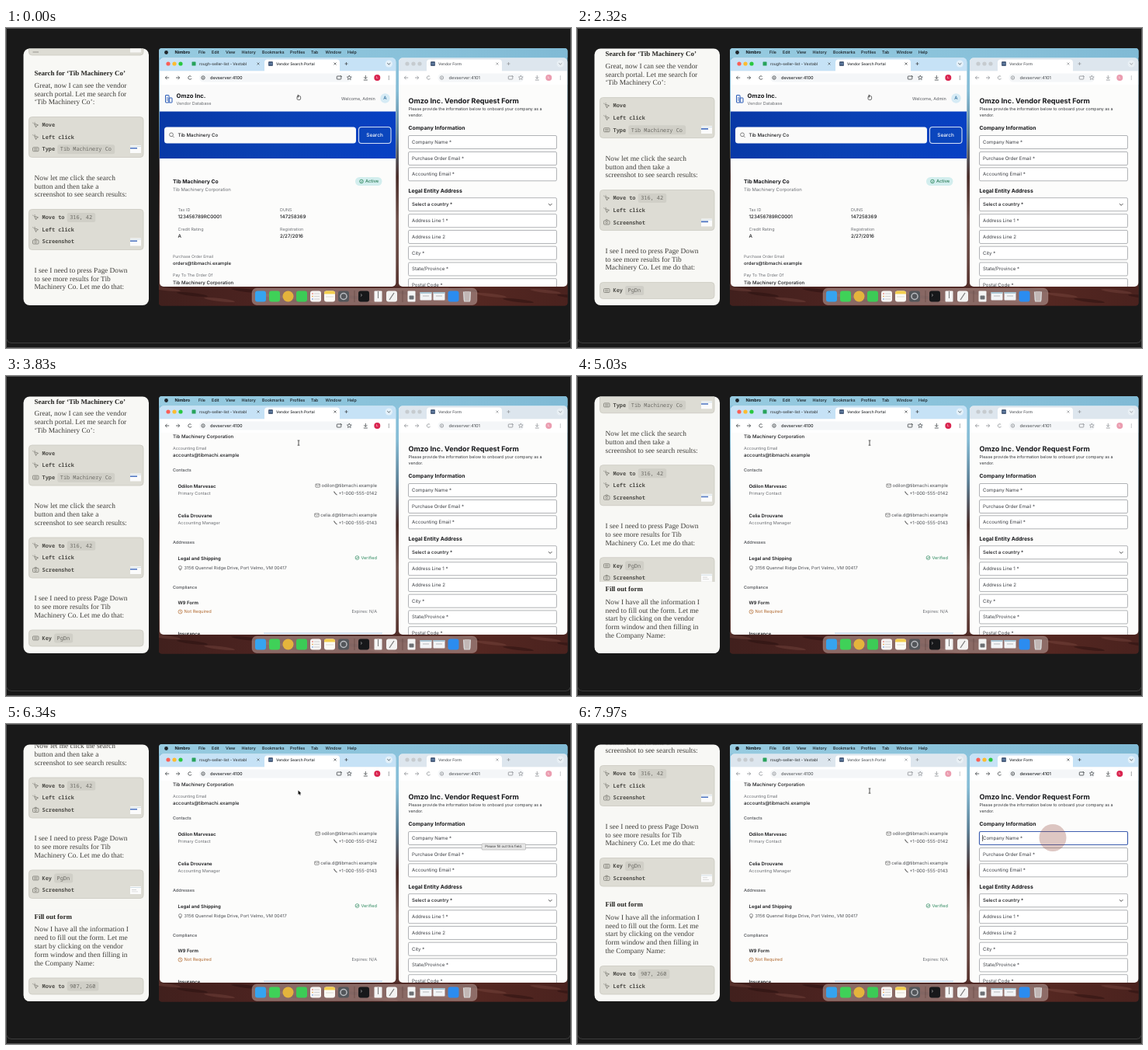
Recreate the animation shown at these times as an HTML page with a canvas. Size 728 px wide and 412 px high, loop 8000 ms.

```html
<!DOCTYPE html>
<html lang="en">
<head>
<meta charset="utf-8">
<title>Vendor form assistant</title>
<style>
html, body { margin: 0; width: 100%; height: 100%; overflow: hidden; background: #191919; }
canvas { display: block; width: 728px; height: 412px; }
</style>
</head>
<body>
<canvas id="stage" width="728" height="412"></canvas>
<script>
const c = document.getElementById('stage').getContext('2d');
c.textRendering = 'geometricPrecision';

const LOOP = 8000;
const SANS = 'Inter, "Open Sans", sans-serif';
const SERIF = '"Liberation Serif", serif';
const MONO = '"Noto Sans Mono", "Liberation Mono", monospace';
const INK = '#18191c', GRAY = '#6b6e73';

const clamp = v => Math.max(0, Math.min(1, v));
const prog = (t, start, dur) => clamp((t - start) / dur);
const snap = p => 1 - Math.pow(1 - p, 6.5);
const glide = p => p < .5 ? 2 * p * p : 1 - 2 * (1 - p) * (1 - p);

function text(s, x, y, size, color = INK, weight = 400, font = SANS, align = 'left') {
  c.font = `${weight} ${size}px ${font}`;
  c.fillStyle = color;
  c.textAlign = align;
  c.fillText(s, x, y + size * .33);
}
function box(x, y, w, h, r, fill, stroke, lw = 1) {
  c.beginPath();
  c.roundRect(x, y, w, h, r);
  if (fill) { c.fillStyle = fill; c.fill(); }
  if (stroke) { c.strokeStyle = stroke; c.lineWidth = lw; c.stroke(); }
}
function dot(x, y, r, fill, stroke, lw = .8) {
  c.beginPath();
  c.arc(x, y, r, 0, 7);
  if (fill) { c.fillStyle = fill; c.fill(); }
  if (stroke) { c.strokeStyle = stroke; c.lineWidth = lw; c.stroke(); }
}
function line(pts, color, lw = .8, close) {
  c.beginPath();
  for (let i = 0; i < pts.length; i += 2) c.lineTo(pts[i], pts[i + 1]);
  if (close) c.closePath();
  c.strokeStyle = color;
  c.lineWidth = lw;
  c.stroke();
}
function clipped(x, y, w, h, r, draw) {
  c.save();
  c.beginPath();
  c.roundRect(x, y, w, h, r);
  c.clip();
  draw();
  c.restore();
}
function faded(alpha, draw) {
  c.save();
  c.globalAlpha *= alpha;
  draw();
  c.restore();
}
function gradient(x0, y0, x1, y1, ...colors) {
  const g = c.createLinearGradient(x0, y0, x1, y1);
  colors.forEach((k, i) => g.addColorStop(i / (colors.length - 1), k));
  return g;
}

// ---- assistant log ----

function rowIcon(kind, y) {
  const k = '#7a7972';
  if (kind === 'keys') {
    box(34.5, y - 2.5, 7.5, 5, 1, null, k, .8);
    line([36, y - .8, 40.5, y - .8], k, .7);
    line([36, y + .9, 40.5, y + .9], k, .7);
  } else if (kind === 'shot') {
    box(34.5, y - 2.2, 7.5, 5, 1, null, k, .8);
    line([36.6, y - 2.6, 37.2, y - 3.4, 39.2, y - 3.4, 39.8, y - 2.6], k);
    dot(38.2, y + .3, 1.3, null, k, .7);
  } else {
    line([36.5, y - 2, 41.5, y, 39.4, y + .8, 38.6, y + 3], k, .8, true);
    line([34.3, y - 3, 35.5, y - 2.3], k);
    line([37, y - 3.8, 37.2, y - 2.8], k);
  }
}
function row([kind, label, chip], y) {
  rowIcon(kind, y);
  text(label, 46.5, y, 6.9, '#4c4b46', 600, MONO);
  if (!chip) return;
  const x = 46.5 + (label.length + 1) * 4.15;
  box(x - 1, y - 6, chip.length * 4.15 + 7.5, 12, 2.5, '#d0cfc7');
  text(chip, x + 2.5, y, 6.9, '#6b6a64', 400, MONO);
}
function thumb(y, blue) {
  box(160, y - 5, 14, 10, .5, '#fbfbfb');
  box(160, y - 4, 14, 1, 0, '#d3e0e6');
  if (blue) box(160, y - 2, 9, 1.6, 0, '#4a72c0');
  else { box(162, y - 1, 6, .8, 0, '#c9c9c9'); box(162, y + 1.4, 8, .8, 0, '#d5d5d5'); }
}
// "grow" is how far the last row has opened
function card(y, rows, grow = 1) {
  const h = 21 + 15.5 * (rows.length - 2 + grow);
  box(29.5, y - 10.5, 147.5, h, 4, '#dddcd4', '#cbcac1', .8);
  clipped(29, y - 10.5, 149, h, 4, () => rows.forEach((r, i) =>
    faded(i && i === rows.length - 1 ? grow : 1, () => row(r, y + i * 15.6))));
}
function para(y, ...lines) {
  lines.forEach((s, i) => text(s, 36.5, y + .5 + i * 10.9, 9.4, '#403f3b', 400, SERIF));
}
const heading = (s, y) => text(s, 36.5, y + .4, 8.9, '#252421', 700, SERIF);

function log(t) {
  const key = snap(prog(t, 2080, 540));
  const shot = glide(prog(t, 4200, 530));
  const fill = snap(prog(t, 4850, 840));
  const move = snap(prog(t, 5750, 380));
  const click = glide(prog(t, 6960, 470));
  const before = 25.5 * key + 15.5 * shot + 98 * fill;
  const after = 25.5 * move + 15.5 * click;

  box(22.5, 26.5, 161.5, 330.5, 8, '#f8f8f5');
  clipped(22.5, 26.5, 161.5, 330.5, 8, () => {
    c.save();
    c.translate(0, -before - after);
    box(29.5, 0, 147.5, 35, 4, '#dddcd4', '#cbcac1', .8);
    line([34.5, 31, 42, 31], '#86857e');
    box(160, 24, 14, 7.5, 0, '#f6f6f4');
    heading('Search for ‘Tib Machinery Co’', 58);
    para(73, 'Great, now I can see the vendor', 'search portal. Let me search for', '‘Tib Machinery Co’:');
    card(125, [['move', 'Move'], ['move', 'Left click'], ['keys', 'Type', 'Tib Machinery Co']]);
    thumb(156, true);
    para(192, 'Now let me click the search', 'button and then take a', 'screenshot to see search results:');
    card(244, [['move', 'Move to', '316, 42'], ['move', 'Left click'], ['shot', 'Screenshot']]);
    thumb(275.5, true);
    para(311, 'I see I need to press Page Down', 'to see more results for Tib', 'Machinery Co. Let me do that:');
    if (key) faded(key, () => card(363, [['keys', 'Key', 'PgDn'], ['shot', 'Screenshot']], shot));
    if (shot) faded(shot, () => thumb(378.5));
    c.restore();

    if (!fill) return;
    c.save();
    c.translate(0, -139 - after + 5 * (1 - fill));
    faded(clamp(fill * 1.3), () => {
      box(23, 403, 160, 200, 0, '#f8f8f5');
      heading('Fill out form', 412);
      para(428, 'Now I have all the information I', 'need to fill out the form. Let me', 'start by clicking on the vendor', 'form window and then filling in', 'the Company Name:');
    });
    if (move) faded(move, () => card(502, [['move', 'Move to', '907, 260'], ['move', 'Left click']], click));
    c.restore();
  });
}

// ---- desktop ----

function wallpaper() {
  box(197, 26, 526.5, 331.5, 4,
    gradient(0, 26, 0, 357, '#8cc4de', '#86bdd6', '#5c8096', '#4a2d29', '#6f524c', '#664640', '#471f1b'));
  clipped(197, 333, 526.5, 24.5, [0, 0, 4, 4], () => {
    box(197, 333, 527, 25, 0, gradient(197, 0, 723, 0, '#41201d', '#4c2320', '#431d1a', '#562822', '#4a221e'));
    for (let i = 0; i < 16; i++) {
      c.beginPath();
      c.ellipse(205 + i * 35, 336 + (i * 7) % 19, 20, 2, .12, 0, 7);
      c.fillStyle = i % 2 ? 'rgba(30,12,12,.4)' : 'rgba(140,88,78,.3)';
      c.fill();
    }
  });
}
function menuBar() {
  box(197, 26, 526.5, 12, [4, 4, 0, 0], gradient(197, 0, 723, 0, '#97cbe0', '#8bc3db', '#80bad5'));
  dot(206.5, 31.5, 2.4, '#20252a');
  text('Nimbro', 217.5, 31.3, 5.5, '#12161a', 700);
  const items = ['File', 248, 'Edit', 265, 'View', 283, 'History', 303.5, 'Bookmarks', 330,
    'Profiles', 366, 'Tab', 393, 'Window', 411.5, 'Help', 440];
  for (let i = 0; i < items.length; i += 2) text(items[i], items[i + 1], 31.3, 5.3, '#12161a', 500);
}
function dock() {
  box(317, 335, 290, 21.5, 6, 'rgba(178,150,146,.62)', 'rgba(205,180,176,.4)', .6);
  const sq = (x, k, w = 14) => box(x - w / 2, 338.5, w, 14, 3, k);
  sq(328, '#35a4f0');
  sq(346, '#3fd158');
  dot(363.5, 345.5, 7, '#e4b43c');
  sq(381, '#3ccb56');
  sq(399, '#f6f5f3');
  for (let i = 0; i < 3; i++) {
    dot(395, 342 + i * 3.5, .8, ['#e0574d', '#e79a35', '#4c8be0'][i]);
    line([397, 342 + i * 3.5, 404, 342 + i * 3.5], '#bbb', .6);
  }
  sq(417, '#fbfaf4');
  box(410, 338.5, 14, 4, [3, 3, 0, 0], '#f3cf4f');
  line([412, 346, 422, 346], '#c9c8c2', .6);
  sq(435, '#53565a');
  dot(435, 345.5, 4, null, '#b9bcc0', 1.5);
  sq(461, '#17181a');
  line([457, 342.5, 458.6, 344, 457, 345.5], '#ddd', .6);
  box(474.5, 338.5, 10, 14, 1, '#f4f4f4');
  line([479.5, 339, 479.5, 348], '#777', 1);
  sq(497, '#f3f3f2');
  line([494, 350, 500, 341], '#777', 1.2);
  line([449, 338, 449, 353], 'rgba(70,40,36,.5)', .7);
  line([511, 338, 511, 353], 'rgba(70,40,36,.5)', .7);
  box(517.5, 338.5, 10, 14, 1, '#f4f4f4');
  box(519.5, 344.5, 6, 5, 1, '#6d7074');
  for (const x of [541, 558]) {
    box(x - 7.5, 340, 15, 10.5, 1, '#f2f4f6');
    box(x - 7.5, 340, 15, 2, 0, '#a9c5d4');
    line([x - 4, 345, x + 4, 345], '#a0a0a0', .7);
  }
  sq(576.5, '#2b8cf0');
  line([589.5, 339.5, 590.7, 352, 597.3, 352, 598.5, 339.5], '#dadada', 1.2);
  box(589.5, 339, 9.2, 13, 2, 'rgba(215,215,215,.7)');
}

function cross(x, y, k) {
  line([x - 1.5, y - 1.5, x + 1.5, y + 1.5], k, .7);
  line([x - 1.5, y + 1.5, x + 1.5, y - 1.5], k, .7);
}
function plus(x, y, k) {
  line([x - 2, y, x + 2, y], k, .7);
  line([x, y - 2, x, y + 2], k, .7);
}
function portalIcon(x, y) {
  box(x - 2.8, y - 2.8, 5.6, 5.6, .6, '#23395b');
  box(x - 1.5, y - 1.5, 1, 3, 0, '#9fc0e6');
  box(x + .6, y - 1.5, 1, 3, 0, '#9fc0e6');
}
// Browser frame: tab strip and toolbar; the page is painted by the callback
function browser(x, w, on, tab, title, url, urlX, page) {
  const k = on ? '#3c4043' : '#8b8f93', r = x + w;
  box(x, 38.5, w, 294.5, 5, '#fcfcfb');
  clipped(x, 38.5, w, 294.5, 5, () => {
    box(x, 38.5, w, 17, 0, on ? '#c6e2f6' : '#dde6ee');
    ['#fb5f57', '#fdbc2f', '#2ac840'].forEach((q, i) => dot(x + 11 + i * 8, 46, 2.6, on ? q : '#c6cbcf'));
    box(tab, 40.5, 97, 16, [4, 4, 0, 0], '#fff');
    portalIcon(tab + 8, 46);
    text(title, tab + 15, 46, 4.9, on ? '#25282b' : '#55595d', 500);
    cross(tab + 91, 46, k);
    plus(tab + 105.5, 46, k);
    dot(r - 9, 46, 4.6, on ? '#e4f1fa' : '#e9f0f5');
    line([r - 11, 45.2, r - 9, 47, r - 7, 45.2], k);

    box(x, 55.5, w, 17.5, 0, '#fff');
    line([x + 12.2, 64, x + 7.5, 64], k);
    line([x + 9.5, 62, x + 7.2, 64, x + 9.5, 66], k);
    line([x + 21, 64, x + 25.5, 64], k);
    line([x + 23.5, 62, x + 25.8, 64, x + 23.5, 66], k);
    c.beginPath();
    c.arc(urlX - 26, 64, 2.2, .4, 5.6);
    c.strokeStyle = k; c.lineWidth = .8; c.stroke();
    box(urlX - 14, 58.5, r - 63 - urlX + 21, 11, 5.5, '#f4f6f8');
    dot(urlX - 9, 64, 2.2, null, k, .8);
    line([urlX - 9, 63, urlX - 9, 65.4], k, .7);
    text(url, urlX, 64, 5.6, on ? '#25282b' : '#5c6064', 500);
    box(r - 76, 62, 5.5, 4, .6, null, k, .8);
    line([r - 71.5, 61, r - 69.5, 63], k);
    c.beginPath();
    for (let i = 0; i < 10; i++) {
      const a = i * Math.PI / 5 - Math.PI / 2, q = i % 2 ? 1.4 : 3;
      c.lineTo(r - 60 + q * Math.cos(a), 64 + q * Math.sin(a));
    }
    c.closePath();
    c.lineWidth = .7; c.stroke();
    line([r - 39, 61, r - 39, 65], k);
    line([r - 41, 63.3, r - 39, 65.3, r - 37, 63.3], k);
    line([r - 41.5, 67, r - 36.5, 67], k);
    dot(r - 24, 64, 4, on ? '#d92550' : '#eb9db0');
    text('L', r - 24, 64, 4, '#fff', 500, SANS, 'center');
    for (let i = -1; i < 2; i++) dot(r - 9, 64 + i * 2, .6, k);
    clipped(x, 73, w, 260, 0, page);
  });
}

// ---- vendor portal ----

function field(label, value, x, y, size = 5.4, big = 6.2) {
  text(label, x, y, size, GRAY);
  text(value, x, y + 9, big, INK, 500);
}
function contact(y, name, role, mail, phone) {
  text(name, 221.5, y, 6, INK, 600);
  text(role, 221.5, y + 9, 5.5, GRAY);
  text(phone, 478, y + 9, 5.9, '#4a4d52', 400, SANS, 'right');
  text(mail, 478, y - 1, 5.9, '#4a4d52', 400, SANS, 'right');
  const x = 478 - c.measureText(mail).width - 4.5;
  box(x - 3, y - 3, 5.5, 4.2, .6, null, '#666', .7);
  line([x - 3, y - 2.6, x - .2, y - .6, x + 2.5, y - 2.6], '#666', .6);
  line([422.5, y + 6.6, 423.6, y + 8.4, 425.4, y + 10.4, 426.6, y + 11], '#666', 1.1);
}
function portal(scroll) {
  c.save();
  c.translate(0, -scroll);
  box(198, 73, 304, 34.5, 0, '#fafafa');
  box(205.5, 86.5, 4.5, 9.5, .5, null, '#2457b5', 1);
  box(210, 90, 4, 6, .5, null, '#2457b5', 1);
  line([207.8, 88.5, 207.8, 94], '#2457b5', .8);
  text('Omzo Inc.', 219.5, 87, 7.7, INK, 700);
  text('Vendor Database', 219.5, 97, 5.5, GRAY);
  text('Welcome, Admin', 432, 91, 5.5, '#5a5d62');
  dot(488.5, 90.5, 6.2, '#d6ebf5');
  text('A', 488.5, 90.5, 6, '#2a6a9b', 500, SANS, 'center');

  box(198, 107.5, 304, 60.5, 0, gradient(198, 107, 502, 168, '#0838a6', '#0a41b4', '#0740c4'));
  box(204, 127.5, 247, 21, 3.5, '#fafafa');
  dot(213, 137.3, 2.4, null, '#666');
  line([214.8, 139.2, 216.6, 141], '#666');
  text('Tib Machinery Co', 221.5, 138, 6.1, INK, 500);
  box(454.5, 127.5, 41.5, 21, 3.5, '#0b46bd', '#d4e0f6', 1.1);
  text('Search', 475, 138, 6.4, '#fff', 500, SANS, 'center');

  text('Tib Machinery Co', 215, 197.5, 6.8, INK, 700);
  text('Tib Machinery Corporation', 215, 208.5, 5.9, GRAY);
  box(450, 192, 34.5, 11, 5.5, '#d3eeee');
  dot(458, 197.5, 2.3, null, '#2f8a60', .8);
  line([457, 197.5, 457.8, 198.4, 459.4, 196.5], '#2f8a60', .7);
  text('Active', 463, 197.5, 5.7, '#2a7a55', 500);
  field('Tax ID', '123456789RC0001', 221.5, 234);
  field('DUNS', '147258369', 353, 234);
  field('Credit Rating', 'A', 221.5, 259);
  field('Registration', '2/27/2016', 353, 259);
  field('Purchase Order Email', 'orders@tibmachi.example', 215, 294, 5.1, 6);
  field('Pay To The Order Of', 'Tib Machinery Corporation', 215, 318.5, 5.3, 6.1);

  c.translate(0, 250);
  field('Accounting Email', 'accounts@tibmachi.example', 215, 93, 5.3, 6.2);
  text('Contacts', 215, 121, 5.5, '#4a4d52', 500);
  contact(142, 'Odilon Marvesac', 'Primary Contact', 'odilon@tibmachi.example', '+1-000-555-0142');
  contact(180, 'Celia Drouvane', 'Accounting Manager', 'celia.d@tibmachi.example', '+1-000-555-0143');
  text('Addresses', 215, 214, 5.5, '#4a4d52', 500);
  text('Legal and Shipping', 221.5, 235, 6, INK, 600);
  dot(224.5, 246.5, 2, null, '#666', .7);
  line([223, 248, 224.5, 250.4, 226, 248], '#666', .7);
  text('3156 Quennel Ridge Drive, Port Velmo, VM 00417', 229.5, 247, 5.7, '#4a4d52');
  dot(452.5, 234, 2.4, null, '#2f8a60', .7);
  line([451.4, 234, 452.3, 235, 453.8, 233], '#2f8a60', .7);
  text('Verified', 478, 234, 5.6, '#2f8a60', 400, SANS, 'right');
  text('Compliance', 215, 272, 5.5, '#4a4d52', 500);
  text('W9 Form', 221.5, 292, 6, INK, 600);
  dot(224.5, 303.5, 2.5, null, '#b0672c', .7);
  line([224.5, 302, 224.5, 303.7, 225.6, 304.3], '#b0672c', .6);
  text('Not Required', 229.5, 303.5, 5.7, '#b0672c');
  text('Expires: N/A', 478, 303.5, 5.6, GRAY, 400, SANS, 'right');
  text('Insurance', 221.5, 332, 6, INK, 600);
  box(332, 330.5, 153, 1.4, 0, '#c3d8ee');
  c.restore();
}

// ---- request form ----

function input(label, y, focus) {
  box(518.5, y - 8.5, 191, 17, 1.5, '#fff', focus ? '#3f5fb0' : '#9fa1a5', focus ? 1.2 : .8);
  text(label, 523, y, 6.1, '#3c3f44');
}
function form(tip, focus) {
  text('Omzo Inc. Vendor Request Form', 518.5, 93.7, 9.1, INK, 700);
  text('Please provide the information below to onboard your company as a', 518.5, 104, 5.35, '#34373b');
  text('vendor.', 518.5, 112.5, 5.35, '#34373b');
  text('Company Information', 518.5, 129, 6.9, INK, 700);
  input('Company Name *', 147, focus);
  input('Purchase Order Email *', 168);
  input('Accounting Email *', 188.3);
  text('Legal Entity Address', 518.5, 210, 6.9, INK, 700);
  input('', 227.2);
  text('Select a country *', 523, 227.2, 6.1, INK, 500);
  line([699, 226.2, 701.2, 228.4, 703.4, 226.2], '#333', .9);
  ['Address Line 1 *', 'Address Line 2', 'City *', 'State/Province *', 'Postal Code *']
    .forEach((s, i) => input(s, 248.2 + i * 20.75));
  if (tip) {
    box(613, 154, 56.5, 8, 1, '#e6e6e6', '#a9a9a9', .6);
    text('Please fill out this field.', 641.3, 158, 4.4, '#333', 400, SANS, 'center');
  }
  if (focus) line([522.6, 143, 522.6, 151], '#222', .7);
}

function pointer(t) {
  if (t < 2840) {
    box(375, 87.5, 4.6, 5, 1.6, '#fff', '#333', .7);
    line([376.3, 85.8, 376.3, 89.5], '#333', 1);
  } else if (t < 5690 || t >= 7680) {
    line([377, 83.2, 377, 89], '#222', .8);
    line([375.6, 83, 378.4, 83], '#222', .7);
    line([375.6, 89.2, 378.4, 89.2], '#222', .7);
  } else {
    c.beginPath();
    for (const [x, y] of [[0, 0], [0, 5.4], [1.3, 4.3], [2.2, 6.2], [3.1, 5.8], [2.3, 3.9], [3.9, 3.8]])
      c.lineTo(376.5 + x, 85.5 + y);
    c.closePath();
    c.fillStyle = '#111';
    c.fill();
  }
}

function draw(t) {
  const formOn = t >= 7680;
  box(0, 0, 728, 412, 0, '#191919');
  box(.5, .5, 727, 411, 0, null, '#555');
  line([1, 401, 3, 404.5, 7, 405.5, 721, 405.5, 725, 404.5, 727, 401], '#3d3d3d', 1);
  log(t);
  wallpaper();
  menuBar();
  dock();

  browser(198, 304.3, !formOn, 333, 'Vendor Search Portal', 'devserver:4100', 263,
    () => portal(250 * glide(prog(t, 2840, 390))));
  box(239.5, 43.5, 5, 5, .6, '#28a25c');
  text('rough-seller-list - Vextabl', 249, 46, 5, '#3c4043', 500);
  cross(325, 46, '#50555a');
  browser(506, 217.3, formOn, 542, 'Vendor Form', 'devserver:4101', 570.5,
    () => form(t >= 6340 && !formOn, formOn));

  pointer(t);
  if (formOn) {
    const p = snap(prog(t, 7640, 330));
    dot(613, 146.5, 8 + 9.5 * p, `rgba(150,75,62,${.31 * p})`);
  }
}

const begin = performance.now();
function tick() {
  draw((performance.now() - begin) % LOOP);
  requestAnimationFrame(tick);
}
tick();
</script>
</body>
</html>
```
